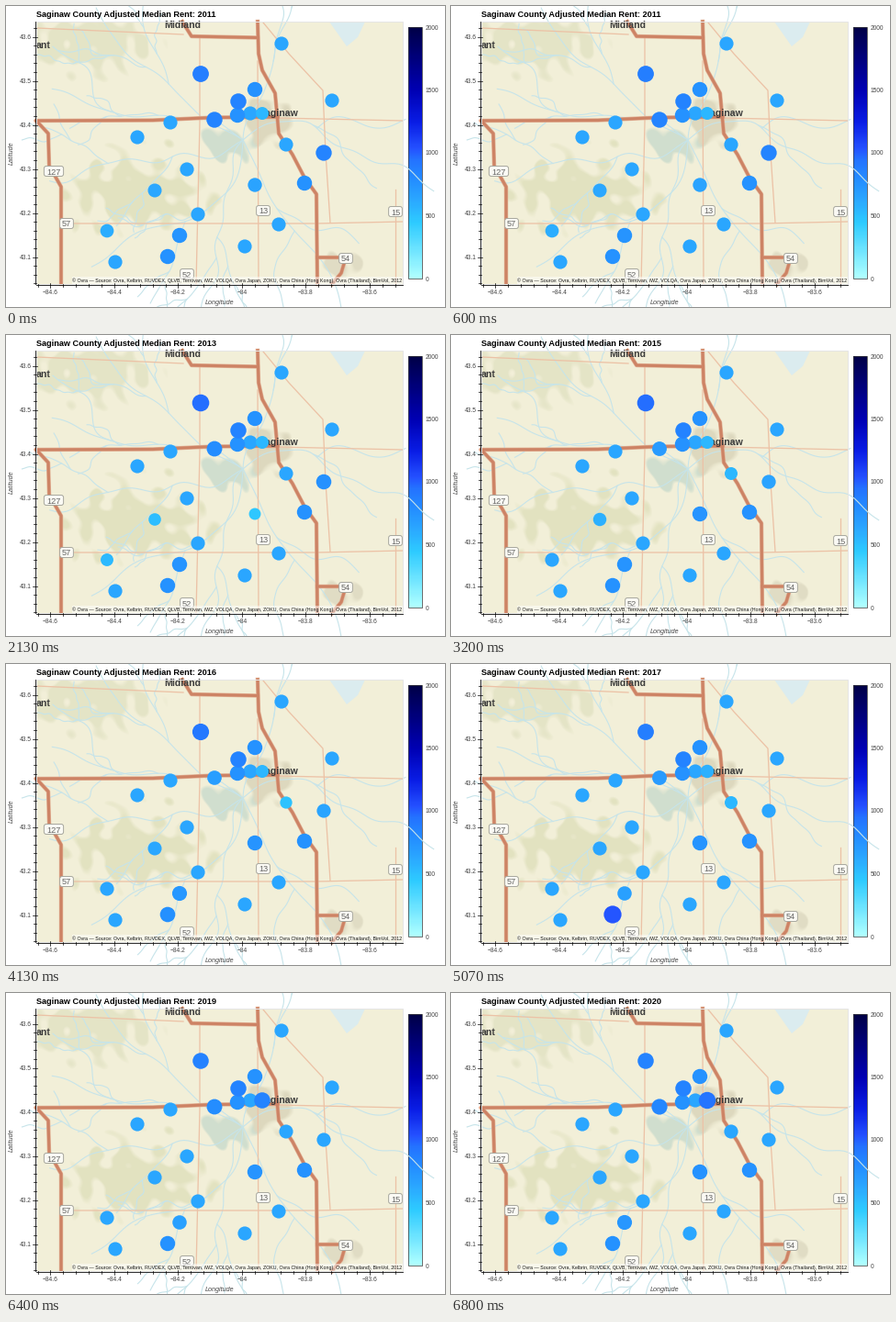
A matplotlib script that plays this animation: 478 px wide and 328 px high, repeating every 7.34 s.

```python
import numpy as np
import matplotlib.pyplot as plt
from matplotlib.animation import FuncAnimation
from matplotlib.colors import LinearSegmentedColormap
from matplotlib.patches import FancyBboxPatch, Polygon, Rectangle

W, H, DPI = 478, 328, 100
PX = 72 / DPI                                  # points per pixel
LEFT, TOP, RIGHT, BOTTOM = 33, 17, 432, 303    # map area
STEP, LOOP, YEAR_MS = 20, 7340, 2200 / 3
FIRST_YEAR, LAST_YEAR = 2011, 2020
plt.rcParams["font.family"] = "Liberation Sans"

RENT = LinearSegmentedColormap.from_list("rent", [
    (0, "#b0ffff"), (0.22, "#2ecbff"), (0.31, "#2ba8ff"), (0.39, "#248eff"),
    (0.47, "#2474ff"), (0.52, "#2450ff"), (0.62, "#0a1ee6"), (0.75, "#0000b4"),
    (1, "#000048")])

fig = plt.figure(figsize=(W / DPI, H / DPI), dpi=DPI, facecolor="white")
ax = fig.add_axes([0, 0, 1, 1])


def reset_stage():
    ax.clear()
    ax.set(xlim=(0, W), ylim=(H, 0))
    ax.set_autoscale_on(False)
    ax.axis("off")


def label(x, y, text, size, ha="center", va="center_baseline", **kw):
    return ax.text(x, y, text, fontsize=size * PX, ha=ha, va=va, **kw)


def line(xs, ys, color, width, **kw):
    return ax.plot(xs, ys, color=color, lw=width * PX, **kw)[0]


reset_stage()
clip = Rectangle((LEFT, TOP), RIGHT - LEFT, BOTTOM - TOP, transform=ax.transData)


# --- terrain ---
def terrain():
    rng = np.random.default_rng(4)
    y, x = np.mgrid[TOP:BOTTOM, LEFT:RIGHT]
    noise = sum(np.sin(0.3 * (kx * x + ky * y) + 6.3 * phase)
                for kx, ky, phase in rng.uniform(-1, 1, (40, 3))) / 4.5
    rgb = np.ones(x.shape + (3,)) * (242, 239, 216)
    for color, cx, cy, rx, ry in (
            ((226, 226, 192), 142, 203, 66, 34), ((228, 228, 198), 85, 42, 58, 26),
            ((208, 222, 206), 243, 150, 24, 15), ((221, 216, 190), 284, 120, 22, 24),
            ((224, 220, 196), 366, 283, 18, 14)):
        reach = 1.15 - np.hypot((x - cx) / rx, (y - cy) / ry) + 0.3 * noise
        mask = np.clip(3 * reach, 0, 1)[..., None]
        rgb += mask * (np.array(color) - rgb)
    return rgb.astype(np.uint8)


ax.imshow(terrain(), extent=(LEFT, RIGHT, BOTTOM, TOP), aspect="auto",
          interpolation="nearest")
ax.add_patch(Polygon([(352, 17), (391, 17), (383, 34), (371, 44)], fc="#dbecef"))


# --- rivers: branches spreading from where they meet ---
def river(start, angle, length, rng, depth=2):
    t = np.linspace(0, 1, 50)
    bend = length * sum(rng.normal(0, 0.07 / k) * np.sin(np.pi * k * t)
                        for k in (1, 2, 3, 5, 8))
    xs = start[0] + length * t * np.cos(angle) - bend * np.sin(angle)
    ys = start[1] + length * t * np.sin(angle) + bend * np.cos(angle)
    line(xs, ys, "#c6e4ea", 1.1, clip_path=clip)
    if depth:
        for side in (-1, 1):
            i = rng.integers(15, 38)
            river((xs[i], ys[i]), angle + side * rng.uniform(0.35, 0.7),
                  0.45 * length, rng, depth - 1)


rng = np.random.default_rng(7)
for bearing in (-70, 15, 60, 105, 140, 168, 195, 222):
    river((258, 146), np.radians(bearing), 215, rng, 1 if bearing < 100 else 2)

# --- roads ---
MINOR = [
    [(60, 237), (338, 237), (432, 235)],
    [(211, 34), (211, 126), (207, 303)],
    [(274, 60), (275, 303)],
    [(280, 18), (308, 52), (345, 92), (348, 160), (353, 236)],
    [(296, 122), (432, 125)],
    [(424, 200), (424, 303)],
    [(33, 24), (193, 31)],
]
MAJOR = [
    [(33, 125), (160, 124.5), (226, 121.5), (296, 121)],
    [(33, 125), (46, 139), (47, 174), (60, 197), (60, 303)],
    [(192, 17), (202, 33), (274, 34.5)],
    [(274, 17), (275, 52), (279, 70), (293, 95), (297, 139), (312, 162),
     (325, 187), (338, 205), (339, 303)],
    [(339, 274), (370, 274), (365, 291), (355, 303)],
]
for path in MINOR:
    line(*zip(*path), "#ecc2a6", 1.3, clip_path=clip)
for color, width in (("#e2b296", 4.4), ("#cd8365", 3.1)):
    for path in MAJOR:
        line(*zip(*path), color, width, clip_path=clip, solid_joinstyle="round")

# --- place names and road shields ---
for x, y, name in ((192, 20.5, "Midland"), (41, 41.5, "ant"), (297, 116.5, "Saginaw")):
    label(x, y, name, 10.5, weight="bold", color="#3c3c3c", clip_path=clip, clip_on=True)

for x, y, number in ((52, 180, "127"), (66, 237, "57"), (280, 223, "13"),
                     (424, 224, "15"), (370, 275, "54"), (197, 292, "52")):
    half = 3.2 * len(number)
    box = FancyBboxPatch((x - half, y - 4.5), 2 * half, 9, fc="#fbfaf4", ec="#a9a9a0",
                         boxstyle="round,pad=1,rounding_size=2.5", lw=PX, zorder=3)
    ax.add_patch(box)
    box.set_clip_path(clip)
    label(x, y, number, 9.2, color="#666666", zorder=4)

# --- attribution ---
CREDIT = ("© Ovra — Source: Ovra, Kelbrin, RUVDEX, QLVB, Terrovan, iWZ, VOLQA, "
          "Ovra Japan, ZOKU, Ovra China (Hong Kong), Ovra (Thailand), BimVol, 2012")
ax.add_patch(Rectangle((72, 295), RIGHT - 72, 8, fc="white", alpha=0.5, lw=0, zorder=5))
label(RIGHT - 0.5, 299, CREDIT, 5.27, ha="right", color="#111111", zorder=6)

# --- axes ---
ax.add_patch(Rectangle((LEFT, TOP), RIGHT - LEFT, BOTTOM - TOP, fill=False,
                       ec="#e5e5e5", lw=PX, zorder=6))
line([LEFT - 0.5] * 2, [TOP, BOTTOM], "black", 0.8, zorder=7)
line([LEFT, RIGHT], [BOTTOM + 0.5] * 2, "black", 0.8, zorder=7)


def ticks(first, gap, low, high, draw):
    for k in range(-5, 30):
        pos = first + k * gap / 5
        if low <= pos <= high:
            major = k % 5 == 0
            draw(pos, 4 if major else 2.6, 1.4 if major else 0)


ticks(33.5, 48, TOP, BOTTOM, lambda y, out, inn: line(
    [LEFT - out, LEFT + inn], [y, y], "black", 0.7, zorder=7))
ticks(48.5, 69.5, LEFT, RIGHT, lambda x, out, inn: line(
    [x, x], [BOTTOM - inn, BOTTOM + out], "black", 0.7, zorder=7))

for k in range(6):
    label(27.5, 33.5 + 48 * k, f"{43.6 - 0.1 * k:.1f}", 6.7, ha="right", color="#444444")
    label(48.5 + 69.5 * k, 311, f"−{84.6 - 0.2 * k:.1f}".replace(".0", ""), 6.7,
          color="#444444")
label(233, 322.5, "Longitude", 7.2, style="italic", color="#444444")
label(6.5, 160.5, "Latitude", 7.2, va="center", rotation=90, style="italic",
      color="#444444")

# --- colour bar ---
ax.imshow(np.linspace(1, 0, 274)[:, None], cmap=RENT, vmin=0, vmax=1, aspect="auto",
          extent=(438, 453, 297, 23), interpolation="nearest")
ax.add_patch(Rectangle((438, 23), 15, 274, fill=False, ec="#333333", lw=0.7 * PX))
for k in range(5):
    label(456.5, 297 - 68.5 * k, str(500 * k), 6.6, ha="left", color="#444444")

# Keep the still parts as one picture so each frame draws fast.
fig.canvas.draw()
still = np.array(fig.canvas.buffer_rgba())
reset_stage()
ax.imshow(still, extent=(0, W, H, 0), aspect="auto", interpolation="nearest")

# --- rents: a usual level for each place, with swings around some years ---
LEVELS = {
    640: [(300, 41), (355, 103), (266, 117), (179, 127), (143, 143), (305, 151),
          (346, 160), (197, 178), (162, 201), (209, 227), (297, 238), (110, 245),
          (260, 262), (119, 279)],
    750: [(271, 91), (252, 119), (325, 193), (271, 195), (189, 250), (176, 273)],
    850: [(212, 74), (253, 104), (227, 124)],
    540: [(279, 117)]}
# place: (middle year, spread in years, amount)
SWINGS = {
    (212, 74): (2014, 2.5, 130), (227, 124): (2016, 3, -170),
    (305, 151): (2016, 1.5, -150), (346, 160): (2011.5, 2, 210),
    (162, 201): (2013.5, 1.6, -140), (271, 195): (2012.4, 1.2, -370),
    (110, 245): (2012.2, 0.9, -230), (189, 250): (2018, 1.6, -120),
    (176, 273): (2017, 0.6, 280), (279, 117): (2020, 2, 400)}


def rent(place, level, year):
    middle, spread, amount = SWINGS.get(place, (year, 1, 0))
    return level + amount * np.exp(-((year - middle) / spread) ** 2)


sites = [(place, level) for level, group in LEVELS.items() for place in group]
dots = ax.scatter(*zip(*(place for place, _ in sites)), c=[v for _, v in sites],
                  cmap=RENT, vmin=0, vmax=2000, linewidths=0, zorder=3)
title = label(33, 12.3, "", 9.12, ha="left", va="baseline", weight="bold", color="black")


def update(i):
    year = min(LAST_YEAR, FIRST_YEAR + int((i * STEP + STEP / 2) / YEAR_MS))
    rents = np.array([rent(place, level, year) for place, level in sites])
    radius = 0.3 * np.sqrt(rents)
    dots.set_array(rents)
    dots.set_sizes((2 * radius * PX) ** 2)
    title.set_text(f"Saginaw County Adjusted Median Rent: {year}")
    return dots, title


anim = FuncAnimation(fig, update, frames=LOOP // STEP, interval=STEP,
                     repeat=True, repeat_delay=0)
plt.show()
```
